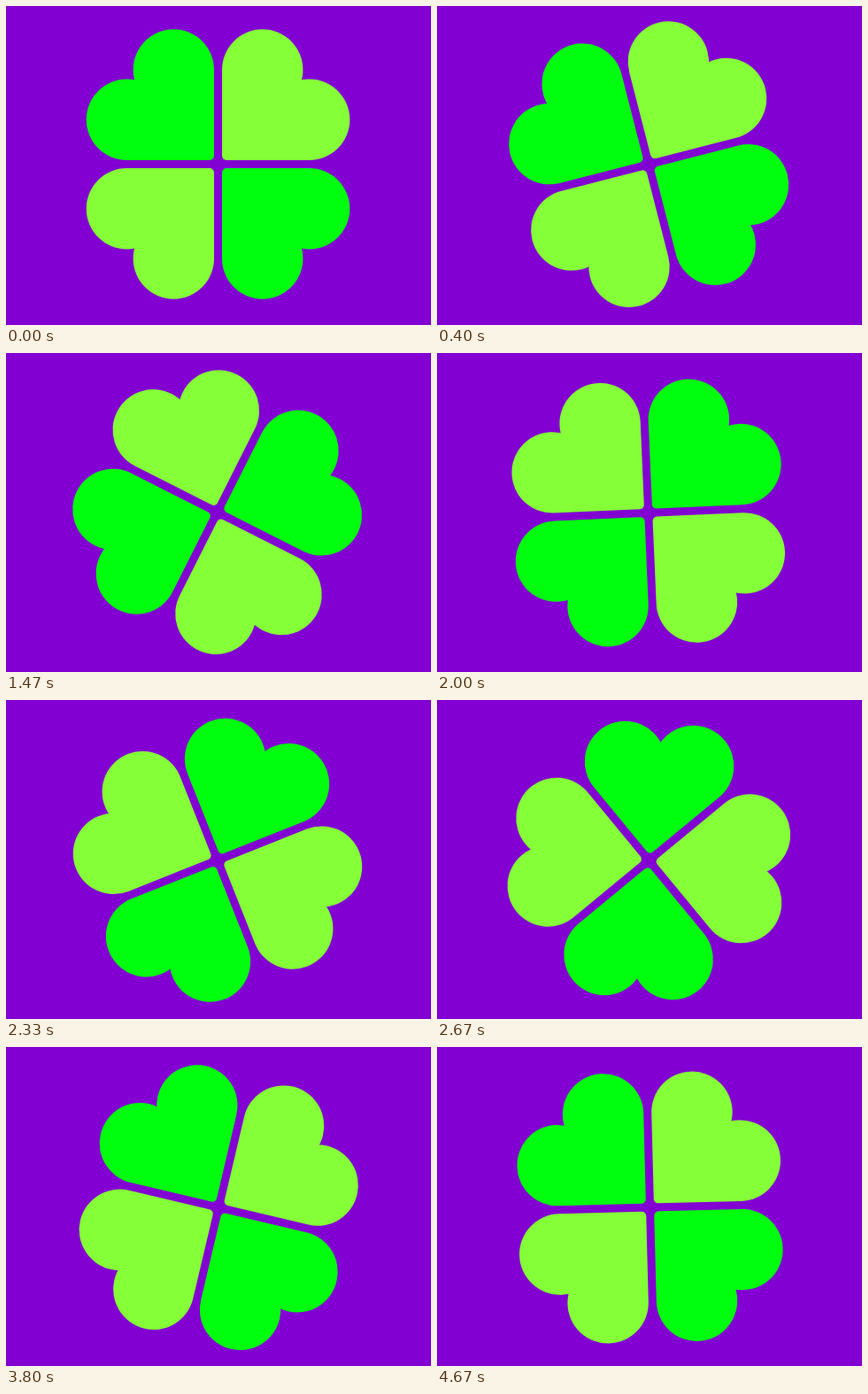
These frames come from a looping animation (480x360 px, 5.07 s). An HTML page with a canvas:

```html
<!DOCTYPE html>
<html lang="en">
<head>
<meta charset="utf-8">
<title>Spinning clover</title>
<style>
  html, body { margin: 0; width: 100%; height: 100%; overflow: hidden; background: #8200d1; }
  canvas { display: block; }
</style>
</head>
<body>
<canvas id="stage" width="480" height="360"></canvas>
<script>
const ctx = document.getElementById('stage').getContext('2d');
const LOOP = 5070;
const STEP = 200 / 3;
const LAST_STEP = 70;
const PIVOT = { x: 240, y: 179.8 };
const HUB = { x: -0.5, y: -1.3 };
const GREEN = '#00ff0e';
const LIME = '#84ff38';

// Counter-clockwise turn: [time in ms, degrees]
const TURN = [
  [0, 0], [800, 30.8], [1467, 63.2], [2000, 92.5],
  [2667, 129.5], [3800, 166.7], [4267, 177.6], [4667, 181.5]
];

const slope = (a, b) => (TURN[b][1] - TURN[a][1]) / (TURN[b][0] - TURN[a][0]);

function tangent(i) {
  const end = TURN.length - 1;
  if (i === 0) return slope(0, 1) * 0.88;
  if (i === end) return slope(end - 1, end) * 0.75;
  const before = TURN[i][0] - TURN[i - 1][0];
  const after = TURN[i + 1][0] - TURN[i][0];
  return (slope(i - 1, i) * after + slope(i, i + 1) * before) / (before + after);
}

// Cubic Hermite curve through the turn keys
function turnAt(t) {
  let i = 0;
  while (i < TURN.length - 2 && t > TURN[i + 1][0]) i++;
  const [t0, a] = TURN[i];
  const [t1, b] = TURN[i + 1];
  const span = t1 - t0;
  const u = Math.min(1, (t - t0) / span);
  const v = 1 - u;
  return a * v * v * (1 + 2 * u) + b * u * u * (3 - 2 * u)
    + span * u * v * (tangent(i) * v - tangent(i + 1) * u);
}

function petal(flipX, flipY, color) {
  const r = 45.7, gap = 4.5, width = 148.8, height = 152.2;
  const upper = { x: gap + r, y: r - height };
  const side = { x: width - r, y: -gap - r };
  ctx.save();
  ctx.scale(flipX, flipY);
  ctx.beginPath();
  ctx.moveTo(side.x, -gap);
  ctx.arcTo(gap, -gap, gap, upper.y, 5);
  ctx.lineTo(gap, upper.y);
  ctx.lineTo(upper.x, upper.y);
  ctx.lineTo(side.x, side.y);
  ctx.closePath();
  for (const lobe of [upper, side]) {
    ctx.moveTo(lobe.x + r, lobe.y);
    ctx.arc(lobe.x, lobe.y, r, 0, Math.PI * 2);
  }
  ctx.fillStyle = color;
  ctx.fill();
  ctx.restore();
}

function draw(time) {
  const t = Math.floor((time % LOOP) / 10) * 10;
  const step = Math.min(LAST_STEP, Math.floor((t + 5) / STEP));
  ctx.fillStyle = '#8200d1';
  ctx.fillRect(0, 0, 480, 360);
  ctx.save();
  ctx.translate(PIVOT.x, PIVOT.y);
  ctx.rotate(-turnAt(step * STEP) * Math.PI / 180);
  ctx.translate(HUB.x, HUB.y);
  petal(-1, 1, GREEN);
  petal(1, 1, LIME);
  petal(-1, -1, LIME);
  petal(1, -1, GREEN);
  ctx.restore();
}

const start = performance.now();
function tick() {
  draw(performance.now() - start);
  requestAnimationFrame(tick);
}
tick();
</script>
</body>
</html>
```
